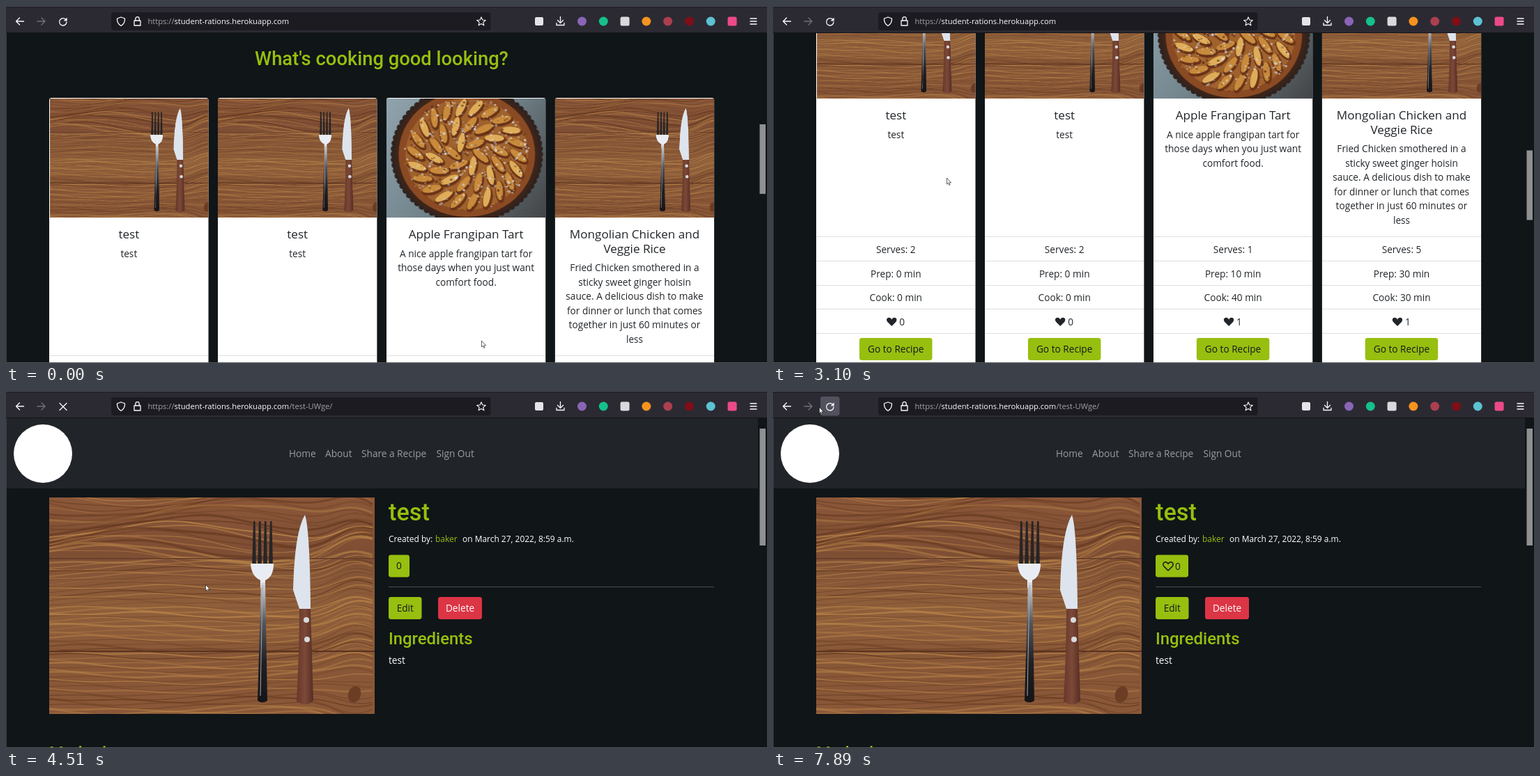
An HTML page with a canvas that plays this animation: 1092x513 px, repeating every 8000 ms.

```html
<!DOCTYPE html>
<html lang="en">
<head>
<meta charset="utf-8">
<title>Recipes</title>
<style>
html, body { margin: 0; width: 100%; height: 100%; overflow: hidden; background: #101518; }
canvas { display: block; }
</style>
</head>
<body>
<canvas id="stage" width="1092" height="513"></canvas>
<script>
const LOOP = 8000, BEAT = 130, REM = 13.67;
const GREEN = '#97bf0f', INK = '#212529', PAGE = '#101518';
const SANS = '"Open Sans", "Noto Sans", sans-serif', HEAD = 'Roboto, sans-serif';
const stage = document.getElementById('stage').getContext('2d');
let c = stage;

// Turning points of the pointer: time, left, top
const pointer = [
  [0, 682, 481], [630, 228, 212], [900, 484, 127], [1050, 420, 8], [1200, 443, 30], [1560, 294, 12],
  [1830, 18, 48], [1950, 413, 59], [2100, 413, 62], [2349, 413, 62], [2350, 380, 110],
  [2710, 249, 247], [3460, 249, 247], [3970, 226, 264], [4240, 194, 312], [4510, 286, 278],
  [4780, 299, 266], [4930, 445, 234], [5200, 479, 230], [5600, 472, 223], [5870, 376, 88],
  [6140, 545, 59], [6410, 12, 42], [6660, 507, 37], [6900, 500, -30], [7050, 347, 14],
  [7320, 459, 55], [7590, 310, 51], [7890, 66, 23]
];
const scrolls = [[2350, 0], [2830, 13], [2980, 100], [3100, 171], [3460, 236], [3610, 262], [3970, 351]];

// Moves between keys in held steps of about one beat; tiny moves jump at the end
function along(keys, t) {
  const i = keys.findIndex(k => k[0] > t);
  if (i < 0) return keys[keys.length - 1].slice(1);
  const [t0, ...a] = keys[Math.max(0, i - 1)], [t1, ...b] = keys[i];
  if (i === 0) return b;
  const tiny = a.length > 1 && Math.hypot(b[0] - a[0], b[1] - a[1]) < 12;
  const n = tiny ? 1 : Math.max(1, Math.round((t1 - t0) / BEAT));
  const k = Math.floor(n * (t - t0) / (t1 - t0) + 1e-6) / n;
  return a.map((v, j) => v + (b[j] - v) * k);
}

function seeded(seed) {
  return () => (seed = seed * 16807 % 2147483647) / 2147483647;
}

function box(x, y, w, h, fill, r = 0) {
  c.fillStyle = fill;
  c.beginPath();
  c.roundRect(x, y, w, h, r);
  c.fill();
}
function oval(x, y, rx, ry, fill, turn = 0) {
  c.fillStyle = fill;
  c.beginPath();
  c.ellipse(x, y, rx, ry, turn, 0, 7);
  c.fill();
}
const disc = (x, y, r, fill) => oval(x, y, r, r, fill);

function shape(d, fill, stroke, width = 1) {
  const p = new Path2D(d);
  if (fill) { c.fillStyle = fill; c.fill(p); }
  if (stroke) { c.strokeStyle = stroke; c.lineWidth = width; c.stroke(p); }
}
// y is the middle of the capitals
function text(s, x, y, size, color, { font = SANS, weight = 400, align = 'left' } = {}) {
  c.font = `${weight} ${size}px ${font}`;
  c.textAlign = align;
  c.fillStyle = color;
  c.fillText(s, x, y + size * 0.357);
}
function shade(x0, y0, x1, y1, ...colors) {
  const g = c.createLinearGradient(x0, y0, x1, y1);
  colors.forEach((k, i) => g.addColorStop(i / (colors.length - 1), k));
  return g;
}
function picture(w, h, paint) {
  const el = document.createElement('canvas');
  el.width = w;
  el.height = h;
  c = el.getContext('2d');
  paint(w, h);
  c = stage;
  return el;
}

const wood = picture(467, 311, (w, h) => {
  const rnd = seeded(41);
  c.fillStyle = shade(0, 0, 0, h, '#8b5739', '#7e4e34', '#8f5f3b', '#885737', '#8a5838');
  c.fillRect(0, 0, w, h);
  for (let y = -20; y < h + 20; y += 4.3) {
    const top = y < 88, amp = top ? 13 : 3.5, phase = top ? y / 22 : y / 50;
    c.strokeStyle = rnd() < 0.62 ? '#bd8849' : '#64391f';
    c.globalAlpha = 0.25 + rnd() * 0.5;
    c.lineWidth = 0.8 + rnd() * (top ? 3 : 1.8);
    c.beginPath();
    for (let x = 0; x <= w; x += 8) {
      const knot = 20 * Math.exp(-(((x - 440) / 42) ** 2)) * Math.tanh((y - 270) / 20);
      c.lineTo(x, y + amp * Math.sin(x / 72 + phase) + 2 * Math.sin(x / 27 + y) + knot);
    }
    c.stroke();
  }
  c.globalAlpha = 1;
  box(0, 87, w, 1.5, '#613a28');
  box(0, 220, w, 2, '#5a321f');
  oval(438, 283, 9, 12, '#6b3d24', 0.3);

  for (let i = 0; i < 4; i++) shape(`M${293 + i * 8} 34 h2.5 l1.5 66 h-6 z`, '#262527');
  shape('M289 95 H322 Q322 114 310 119 V130 H303 V119 Q290 113 289 95Z', '#e9edf3');
  shape('M304 122 H310 L313 292 Q306 297 299 292Z',
    shade(0, 122, 0, 294, '#d8dce2', '#55565b', '#202024', '#151518'));
  shape('M306 126 L303 285', null, '#a7a7aa');
  shape('M367 25 Q374 45 375 160 H359 L350 133 Q352 50 367 25Z', '#dde4ed');
  shape('M359 160 H375 L379 292 Q369 302 355 293 Q359 220 359 160Z',
    shade(355, 0, 379, 0, '#67372a', '#7d4938', '#552e24'));
  disc(369, 176, 4, '#d7dadd');
  disc(370, 204, 4, '#d7dadd');
});

const tart = picture(228, 171, (w, h) => {
  const rnd = seeded(9), cx = 115, cy = 80;
  c.fillStyle = shade(0, 0, w, h, '#91a4ad', '#71838b', '#434446');
  c.fillRect(0, 0, w, h);
  const around = (a, r, paint) => paint(cx + Math.cos(a) * r, cy + Math.sin(a) * r * 0.91);
  for (let i = 0; i < 76; i++) around(i / 76 * 6.283, 105, (x, y) => disc(x, y, 4.5, '#30231f'));
  oval(cx, cy, 104, 95, '#3b241a');
  oval(cx, cy, 98, 90, '#8a4a23');
  oval(cx, cy, 88, 80, '#a0622d');
  for (let r = 74; r > 0; r -= 27) {
    const n = Math.round(r * 0.3);
    for (let i = 0; i < n; i++) {
      const a = i / n * 6.283 + r;
      around(a, r, (x, y) => {
        oval(x + 1, y + 2, 16, 7, '#6b3417', a + 0.6);
        oval(x, y, 14, 5, i % 3 ? '#c88a3b' : '#dfad59', a + 0.6);
      });
    }
  }
  for (let i = 0; i < 520; i++) {
    c.globalAlpha = 0.3 + rnd() * 0.5;
    around(rnd() * 6.283, Math.sqrt(rnd()) * 90,
      (x, y) => disc(x, y, 0.5 + rnd() * 1.5, i % 3 ? '#dadde3' : '#5a2c16'));
  }
  c.globalAlpha = 1;
});

const bake = picture(223, 167, (w, h) => {
  const rnd = seeded(5);
  box(0, 0, w, h, shade(0, 0, w, 0, '#4c2219', '#a48b75', '#d3d7da'));
  box(28, -6, 167, 160, '#f1ece0', 20);
  box(38, 4, 147, 138, '#c87a38', 14);
  for (let i = 0; i < 60; i++)
    oval(46 + rnd() * 130, 10 + rnd() * 124, 10, 6, ['#f3dfae', '#e9bd69', '#ad3f20'][i % 3], rnd() * 3);
});
const muffins = picture(223, 167, (w, h) => {
  box(0, 0, w, h, shade(0, 0, w, h, '#828583', '#c3bdb2', '#8b7b6b'));
  for (let i = 0; i < 9; i++) {
    const x = 50 + i % 3 * 75 - (i > 2 ? 14 : 0), y = 14 + Math.floor(i / 3) * 62;
    box(x - 24, y, 48, 38, '#9a632e', 10);
    oval(x, y, 32, 18, '#b9803f');
    for (let k = 0; k < 5; k++) disc(x - 18 + k * 9, y + k * 5 % 8 - 4, 3, '#633a20');
  }
});
const brownies = picture(223, 167, (w, h) => {
  box(0, 0, w, h, shade(0, 0, w, h, '#67283a', '#9d6871', '#552331'));
  oval(115, 115, 96, 48, '#d5c9c3');
  for (let i = 0; i < 6; i++) {
    c.save();
    c.translate(75 + i % 3 * 38, 105 - Math.floor(i / 3) * 55);
    c.rotate(i * 0.7 - 1);
    box(-32, -20, 64, 40, i % 2 ? '#392019' : '#4d2b20', 4);
    c.restore();
  }
});
const salad = picture(223, 167, (w, h) => {
  const rnd = seeded(17);
  box(0, 0, w, h, shade(0, 0, w, h, '#d7d6d2', '#95958f', '#56584f'));
  oval(112, 95, 103, 88, '#777d7a');
  oval(112, 97, 89, 75, '#bdbfb9');
  for (let i = 0; i < 60; i++) {
    const a = rnd() * 6.28, r = Math.sqrt(rnd()) * 65;
    oval(112 + Math.cos(a) * r, 92 + Math.sin(a) * r * 0.8, 14, 7,
      ['#55712c', '#8d9e3e', '#bb572d', '#d7a557'][i % 4], a);
  }
});

function heart(x, y, filled) {
  c.save();
  c.translate(x, y);
  shape('M0 6 L-6 0 C-10 -5 -3 -9 0 -3.5 C3 -9 10 -5 6 0Z', filled && INK, filled ? null : '#121518', 1.5);
  c.restore();
}
function button(x, y, w, label, fill = GREEN, color = '#15191c', weight = 500) {
  box(x, y, w, 32, fill, 3.4);
  text(label, x + w / 2, y + 16, REM, color, { weight, align: 'center' });
}

const cards = [
  { title: ['test'], body: ['test'], serves: 2, prep: 0, cook: 0, likes: 0 },
  { title: ['test'], body: ['test'], serves: 2, prep: 0, cook: 0, likes: 0 },
  { title: ['Apple Frangipan Tart'], photo: tart, serves: 1, prep: 10, cook: 40, likes: 1,
    body: ['A nice apple frangipan tart for', 'those days when you just want', 'comfort food.'] },
  { title: ['Mongolian Chicken and', 'Veggie Rice'], serves: 5, prep: 30, cook: 30, likes: 1,
    body: ['Fried Chicken smothered in a', 'sticky sweet ginger hoisin', 'sauce. A delicious dish to make',
      'for dinner or lunch that comes', 'together in just 60 minutes or', 'less'] }
];

function drawCard(card, x, hover) {
  const mid = x + 114.3, center = { align: 'center' };
  c.save();
  c.beginPath();
  c.roundRect(x, 132, 228.5, 555, 3.4);
  c.clip();
  c.fillStyle = '#fff';
  c.fillRect(x, 132, 229, 555);
  if (card.photo) c.drawImage(card.photo, x + 0.5, 133, 228, 171);
  else c.drawImage(wood, 26, 0, 415, 311, x + 0.5, 133, 228, 171);
  c.restore();

  let y = 328;
  for (const s of card.title) {
    text(s, mid, y, 17.1, INK, { weight: 500, align: 'center' });
    y += 20.5;
  }
  y += 7.3;
  for (const s of card.body) {
    text(s, mid, y, REM, INK, center);
    y += 20.5;
  }
  for (let i = 0; i < 5; i++) box(x + 0.5, Math.round(502 + i * 34.8), 227.5, 1, '#dfdfdf');
  [`Serves: ${card.serves}`, `Prep: ${card.prep} min`, `Cook: ${card.cook} min`]
    .forEach((s, i) => text(s, mid, 521 + i * 34.7, REM, INK, center));
  heart(mid - 6, 625, true);
  text(card.likes, mid + 5, 625, REM, INK);
  button(mid - 52.3, 648, 104.5, 'Go to Recipe', hover ? '#a7c933' : GREEN);
}

function drawList(scroll, t) {
  c.save();
  c.translate(0, -scroll);
  text("What's cooking good looking?", 539, 75, 27.34, GREEN, { font: HEAD, weight: 500, align: 'center' });
  cards.forEach((card, i) => drawCard(card, 62 + i * 241.9, i === 0 && t >= 4120));
  [bake, muffins, brownies, salad].forEach((img, i) => {
    const x = 62 + i * 243.6;
    c.save();
    c.beginPath();
    c.roundRect(x, 701, 223, 167, 3.4);
    c.clip();
    c.drawImage(img, x, 701);
    c.restore();
  });
  c.restore();
  box(1081.5, 170 + scroll * 0.2195, 8.5, 100, '#8f9092');
}

function drawRecipe(t) {
  const head = { font: HEAD, weight: 500 };
  box(0, 39, 1079, 101, INK);
  disc(53, 90, 42, '#ffffff');
  const link = (s, x) => text(s, x, 90, REM, '#9b9d9f');
  link('Home', 406);
  link('About', 458);
  link('Share a Recipe', 510);
  link('Sign Out', 617.5);
  c.drawImage(wood, 62, 153);
  text('test', 549, 174, 34.2, GREEN, head);
  const small = (s, x, color) => text(s, x, 212.5, 11.96, color);
  small('Created by:', 549, '#fff');
  small('baker', 616, GREEN);
  small('on March 27, 2022, 8:59 a.m.', 655, '#fff');
  const loaded = t >= 4630;
  button(549, 235.5, loaded ? 47 : 30, loaded ? '' : '0');
  if (loaded) {
    heart(567, 252, false);
    text('0', 577, 252, REM, '#15191c', { weight: 500 });
  }
  box(549, 281, 467, 1, '#4c5052');
  button(549, 296, 47.5, 'Edit');
  button(620, 296, 63, 'Delete', '#dc3545', '#fff', 400);
  text('Ingredients', 549, 355.5, 23.9, GREEN, head);
  text('test', 549, 387, REM, '#fff');
  text('Method', 62, 519, 23.9, GREEN, head);
  box(1081.5, 54, 8.5, 168, '#8f9092');
}

function drawBrowser(t, recipe) {
  const icon = '#fbfbfe', dim = '#a3a2aa';
  const line = (d, color = icon, width = 1.3) => shape(d, null, color, width);
  box(0, 0, 1092, 39, '#2b2a33');
  box(0, 0, 1092, 1, '#4b4a52');
  box(0, 1, 1092, 1, '#1c1b22');
  box(0, 38, 1092, 1, '#15141a');
  c.lineCap = c.lineJoin = 'round';
  line('M25.5 22 h-11 m5 -5 l-5 5 l5 5');
  line('M45 22 h11 m-5 -5 l5 5 l-5 5', '#72717a');
  if (t >= 7890) box(68, 8, 27.5, 27.5, '#52525e', 3.5);
  if (recipe && t < 4780) line('M77 17.5 l10 10 m0 -10 l-10 10');
  else {
    const tone = recipe && t < 5080 ? dim : icon;
    line('M86.2 20 A5.2 5.2 0 1 0 87 23', tone);
    shape('M87.6 16.5 v5 h-5z', tone);
  }

  box(151, 9, 544.5, 26, '#1c1b22', 3.5);
  line('M165 16 l5.5 2 Q171 25 165 28.5 Q159 25 159.5 18z');
  line('M184 21 h9 v7 h-9z m1.8 0 v-2.5 a2.7 2.8 0 0 1 5.4 0 v2.5');
  text('https://', 203.5, 22, 11.15, dim);
  text('student-rations.herokuapp.com', 241.5, 22, 11.15, icon);
  if (recipe) text('/test-UWge/', 406.5, 22, 11.15, dim);
  let star = '';
  for (let i = 0; i < 10; i++) {
    const r = i % 2 ? 3 : 6.6, a = i * Math.PI / 5 - Math.PI / 2;
    star += `${i ? 'L' : 'M'}${682 + r * Math.cos(a)} ${22.5 + r * Math.sin(a)}`;
  }
  line(star + 'Z', icon, 1.1);

  box(759, 16, 12, 12, '#e4e4e8', 2);
  line('M795.5 15.5 v8.5 m-4 -3.5 l4 4 l4 -4 M790 24.5 v3 h11 v-3');
  const addons = ['#8a65b5', '#15c08b', '#d9d9dc', '#f5931e', '#ab3f50', '#7f0e17', '#5cc2d2', '#ec4a86'];
  addons.forEach((color, i) => {
    const x = 826.5 + i * 30.8;
    if (i === 2 || i === 7) box(x - 6.5, 15.5, 13, 13, color, 2.5);
    else disc(x, 22, 6.5, color);
  });
  line('M1068 18 h9 m-9 4 h9 m-9 4 h9');
}

function drawPointer(t, recipe) {
  const [x, y] = along(pointer, t);
  const inBar = x > 151 && x < 690 && y > 9 && y < 32;
  const onTitle = !recipe && t < 2350 && y > 57 && y < 85 && x > 357;
  c.save();
  c.translate(x, y);
  if (inBar || onTitle) shape('M0.5 0.5 h3.6 m-1.8 0 v10 m-1.8 0 h3.6', null, '#dcdcdc', 0.9);
  else shape('M0.5 0.5 V9 L2.4 7.3 L3.7 10.4 L5 9.8 L3.8 6.8 H6.2Z', '#fff', '#222', 0.7);
  c.restore();
}

function draw(now) {
  const t = now % LOOP, recipe = t >= 4390;
  box(0, 0, 1092, 513, PAGE);
  if (recipe) drawRecipe(t);
  else drawList(along(scrolls, t)[0], t);
  drawBrowser(t, recipe);
  box(0, 39, 1, 474, '#3b3e42');
  box(0, 512, 1092, 1, '#55585b');
  drawPointer(t, recipe);
}

const start = performance.now();
function tick() {
  draw(performance.now() - start);
  requestAnimationFrame(tick);
}
tick();
</script>
</body>
</html>
```
